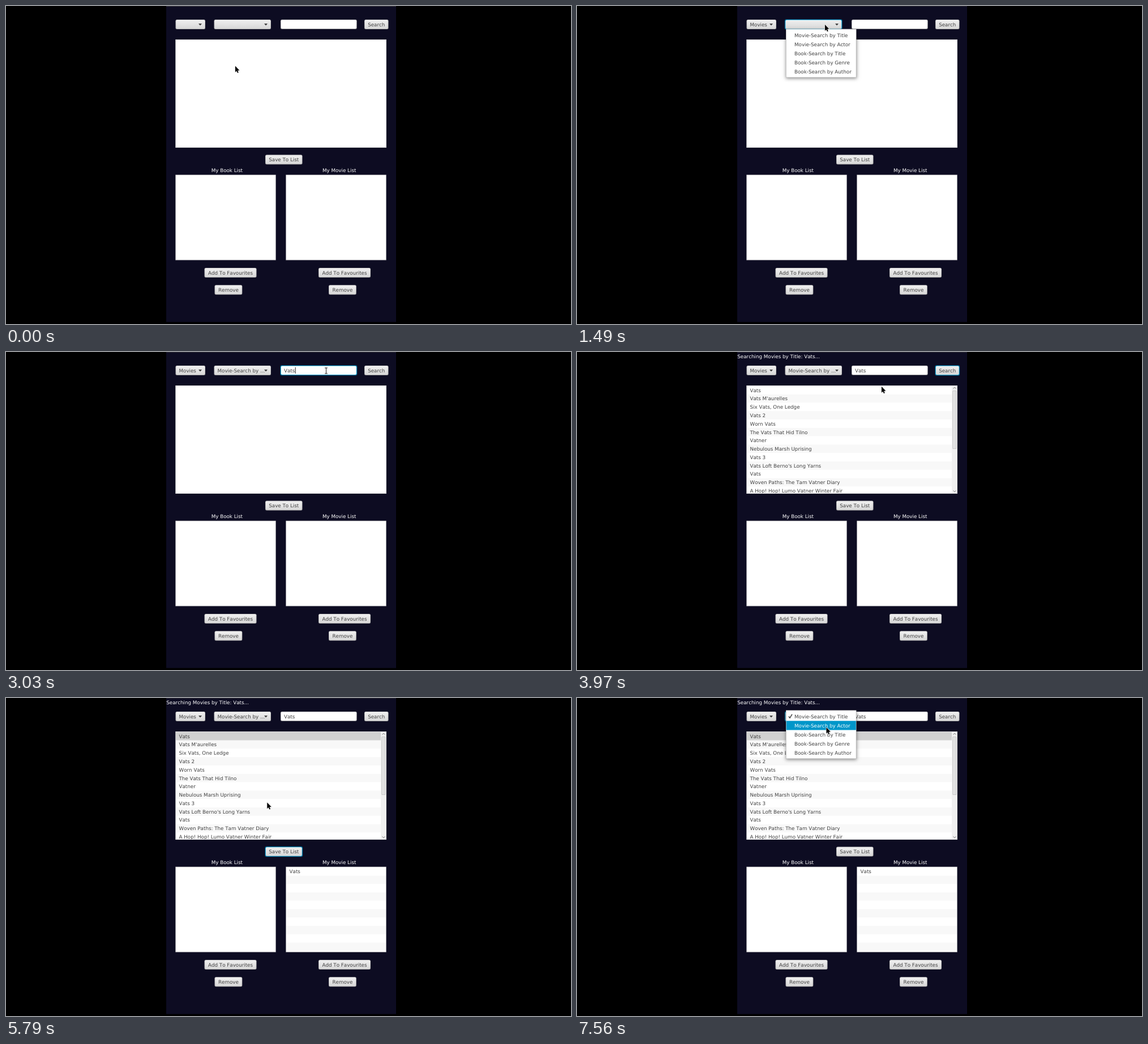
These frames come from a looping animation (998x561 px, 8 s). An HTML page with a canvas:

```html
<!DOCTYPE html>
<html lang="en">
<head>
<meta charset="utf-8">
<title>Book and movie search</title>
<style>
html, body { margin: 0; width: 100%; height: 100%; overflow: hidden; background: #000; }
canvas { display: block; }
</style>
</head>
<body>
<canvas id="stage" width="998" height="561"></canvas>
<script>
const ctx = document.getElementById('stage').getContext('2d');
const LOOP = 8000, ROW = 14.78, ITEM = 16.15;
const BLUE = '#0096c9', RING = '#039ed3', INK = '#404040';
const QUERY = 'Vats';
const RESULTS = [
  'Vats', "Vats M'aurelles", 'Six Vats, One Ledge', 'Vats 2', 'Worn Vats',
  'The Vats That Hid Tilno', 'Vatner', 'Nebulous Marsh Uprising', 'Vats 3',
  "Vats Loft Berno's Long Yarns", 'Vats', 'Woven Paths: The Tam Vatner Diary',
  'A Hop! Hop! Lumo Vatner Winter Fair'
];
const MODES = ['Movie-Search by Title', 'Movie-Search by Actor', 'Book-Search by Title',
  'Book-Search by Genre', 'Book-Search by Author'];

// Where the pointer rests; it eases from one stop to the next
const STOPS = [
  { x: 405, y: 106, from: 0, to: 50 },
  { x: 332, y: 52, from: 560, to: 840 },
  { x: 438, y: 33, from: 1170, to: 1490 },
  { x: 453, y: 52, from: 1680, to: 1820 },
  { x: 545, y: 33, from: 2330, to: 2940 },
  { x: 655, y: 33, from: 3270, to: 3780 },
  { x: 538, y: 61, from: 3970, to: 3970 },
  { x: 326, y: 70, from: 4480, to: 4720 },
  { x: 483.5, y: 270.5, from: 4900, to: 5480 },
  { x: 421.5, y: 30, from: 6250, to: 6300 },
  { x: 440.5, y: 52, from: 6860, to: LOOP }
];

function pointer(t) {
  const i = STOPS.findIndex(s => t < s.to);
  const b = STOPS[i], a = STOPS[i - 1] || b;
  const k = t >= b.from ? 1 : (t - a.to) / (b.from - a.to);
  const e = k * k * (3 - 2 * k);
  return [a.x + (b.x - a.x) * e, a.y + (b.y - a.y) * e];
}

function rect(x, y, w, h, fill) {
  ctx.fillStyle = fill;
  ctx.fillRect(x, y, w, h);
}

function round(x, y, w, h, r, fill) {
  ctx.fillStyle = fill;
  ctx.beginPath();
  ctx.roundRect(x, y, w, h, r);
  ctx.fill();
}

function text(s, x, y, color = INK, align = 'left') {
  ctx.fillStyle = color;
  ctx.textAlign = align;
  ctx.fillText(s, x, y);
}

function poly(points, fill) {
  ctx.beginPath();
  points.forEach(([x, y]) => ctx.lineTo(x, y));
  ctx.closePath();
  ctx.fillStyle = fill;
  ctx.fill();
}

function line(points, color, width) {
  ctx.beginPath();
  points.forEach(([x, y]) => ctx.lineTo(x, y));
  ctx.strokeStyle = color;
  ctx.lineWidth = width;
  ctx.stroke();
}

function shade(y, h, top, bottom) {
  const g = ctx.createLinearGradient(0, y, 0, y + h);
  g.addColorStop(0, top);
  g.addColorStop(1, bottom);
  return g;
}

function box(x, y, w, h, focus, fill) {
  if (focus) round(x - .8, y - .8, w + 1.6, h + 1.6, 3, 'rgba(3,158,211,.4)');
  round(x, y, w, h, 2.5, focus ? RING : shade(y, h, '#c6c6c6', '#a4a4a4'));
  round(x + .8, y + .8, w - 1.6, h - 1.6, 2, fill);
}

function button(x, y, w, focus, label = '') {
  box(x, y, w, 17, focus, shade(y, 17, '#f1f1f1', '#d6d6d6'));
  text(label, x + w / 2, y + 11.7, INK, 'center');
}

function combo(x, w, focus, label) {
  button(x, 24, w, focus);
  text(label, x + 6, 35.7);
  const a = x + w - 9;
  poly([[a - 3, 31], [a + 3, 31], [a, 34.5]], INK);
}

function list(x, y, w, h, focus) {
  rect(x, y, w, h, focus ? RING : '#cfcfcf');
  rect(x + .8, y + .8, w - 1.6, h - 1.6, '#fff');
}

function rows(items, x, y, w, h, selected) {
  ctx.save();
  ctx.beginPath();
  ctx.rect(x, y, w, h);
  ctx.clip();
  for (let i = 0; i * ROW < h; i++) {
    const top = y + i * ROW, mark = i === 0 && selected;
    rect(x, top, w, ROW, mark || (i % 2 ? '#f8f8f8' : '#fff'));
    text(items[i] || '', x + 5.5, top + 10.6, mark === BLUE ? '#fff' : INK);
  }
  ctx.restore();
}

function scrollbar(x, y, h) {
  rect(x, y, 9, h, '#f0f0f0');
  round(x + 1.3, y + 8, 7, 103, 1.5, '#c2c2c2');
  round(x + 2, y + 8.7, 5.6, 101.6, 1, '#e2e2e2');
  [[y + 3.5, 1.2], [y + h - 3.5, -1.2]].forEach(([cy, d]) =>
    line([[x + 2.5, cy + d], [x + 5, cy - d], [x + 7.5, cy + d]], '#777', 1));
}

function popup(items, x, y, w, hover, checked) {
  const h = items.length * ITEM + 5;
  ctx.save();
  ctx.shadowColor = 'rgba(0,0,0,.45)';
  ctx.shadowBlur = 6;
  ctx.shadowOffsetY = 2;
  rect(x, y, w, h, '#b8b8b8');
  ctx.restore();
  rect(x + .7, y + .7, w - 1.4, h - 1.4, '#fff');
  items.forEach((s, i) => {
    const top = y + 2.7 + i * ITEM, color = i === hover ? '#fff' : INK;
    if (i === hover) rect(x + .7, top, w - 1.4, ITEM, BLUE);
    text(s, x + 15, top + 11.5, color);
    if (i === 0 && checked) {
      line([[x + 5, top + 8.3], [x + 7, top + 11], [x + 11, top + 4.5]], color, 1.5);
    }
  });
}

function cursor(x, y) {
  if (x > 486 && x < 618 && y < 41) {
    rect(x - .5, y - 5, 1, 10, '#222');
    [-5.5, 4.5].forEach(d => rect(x - 2.5, y + d, 5, 1, '#222'));
    return;
  }
  ctx.save();
  ctx.translate(x, y);
  ctx.lineJoin = 'round';
  const arrow = [[0, 0], [0, 10.5], [2.4, 8.4], [4, 12], [5.6, 11.3], [4.1, 7.8], [7.2, 7.6], [0, 0]];
  line(arrow, '#ddd', 1.5);
  poly(arrow, '#000');
  ctx.restore();
}

function draw(t) {
  const between = (a, b) => t >= a && t < b;
  const found = t >= 3640, saved = t >= 5460;

  rect(0, 0, 998, 561, '#000');
  rect(283, 0, 406, 557.5, '#0d0c22');
  rect(283, 0, 406, 1, t < 50 ? '#3a3a40' : '#24232f');
  if (found) text(`Searching Movies by Title: ${QUERY}...`, 283.3, 10.7, '#fff');

  combo(299.5, 52.5, between(430, 1170), t >= 840 ? 'Movies' : '');
  combo(367.5, 100.5, between(1170, 2330) || t >= 6250, t >= 1820 ? 'Movie-Search by ...' : '');
  box(485, 24, 134.7, 16.7, between(2330, 3270), '#fff');
  if (t >= 2800) text(QUERY, 491, 35.7);
  if (between(2380, 2570)) rect(490.7, 27, 1, 11, '#222');
  if (between(2800, 3270)) rect(510.7, 27, 1, 11, '#222');
  button(633, 24, 42.5, between(3270, 4620), 'Search');

  list(299.2, 59, 372.8, 191, between(4620, 5460));
  if (found) {
    rows(RESULTS, 300, 60, 362, 189, saved ? '#d1d1d1' : t >= 4620 && BLUE);
    scrollbar(662, 60, 189);
  }

  button(458, 262.5, 65.5, between(5460, 6250), 'Save To List');
  text('My Book List', 390.3, 293, '#fff', 'center');
  text('My Movie List', 588.7, 293, '#fff', 'center');
  [299.3, 494.3].forEach(x => list(x, 297.7, 177.4, 150.7));
  if (saved) rows([QUERY], 495.1, 298.6, 175.8, 149);
  [396.5, 598].forEach(mid => {
    button(mid - 46, 462, 92, false, 'Add To Favourites');
    button(mid - 28, 492.3, 48.8, false, 'Remove');
  });

  if (between(480, 840)) popup(['Movies', 'Books'], 301, 40.5, 62, t > 560 ? 0 : -1);
  if (between(1170, 1820)) popup(MODES, 369, 40.5, 124.5, t >= 1590 ? 0 : -1);
  if (t >= 6300) popup(MODES, 369, 21.5, 124.5, t < 6620 ? 0 : 1, true);
  cursor(...pointer(t));
}

ctx.font = '8.74px "DejaVu Sans", Verdana, sans-serif';
ctx.textRendering = 'geometricPrecision';
ctx.fontKerning = 'none';
const start = performance.now();
function tick() {
  draw((performance.now() - start) % LOOP);
  requestAnimationFrame(tick);
}
tick();
</script>
</body>
</html>
```
